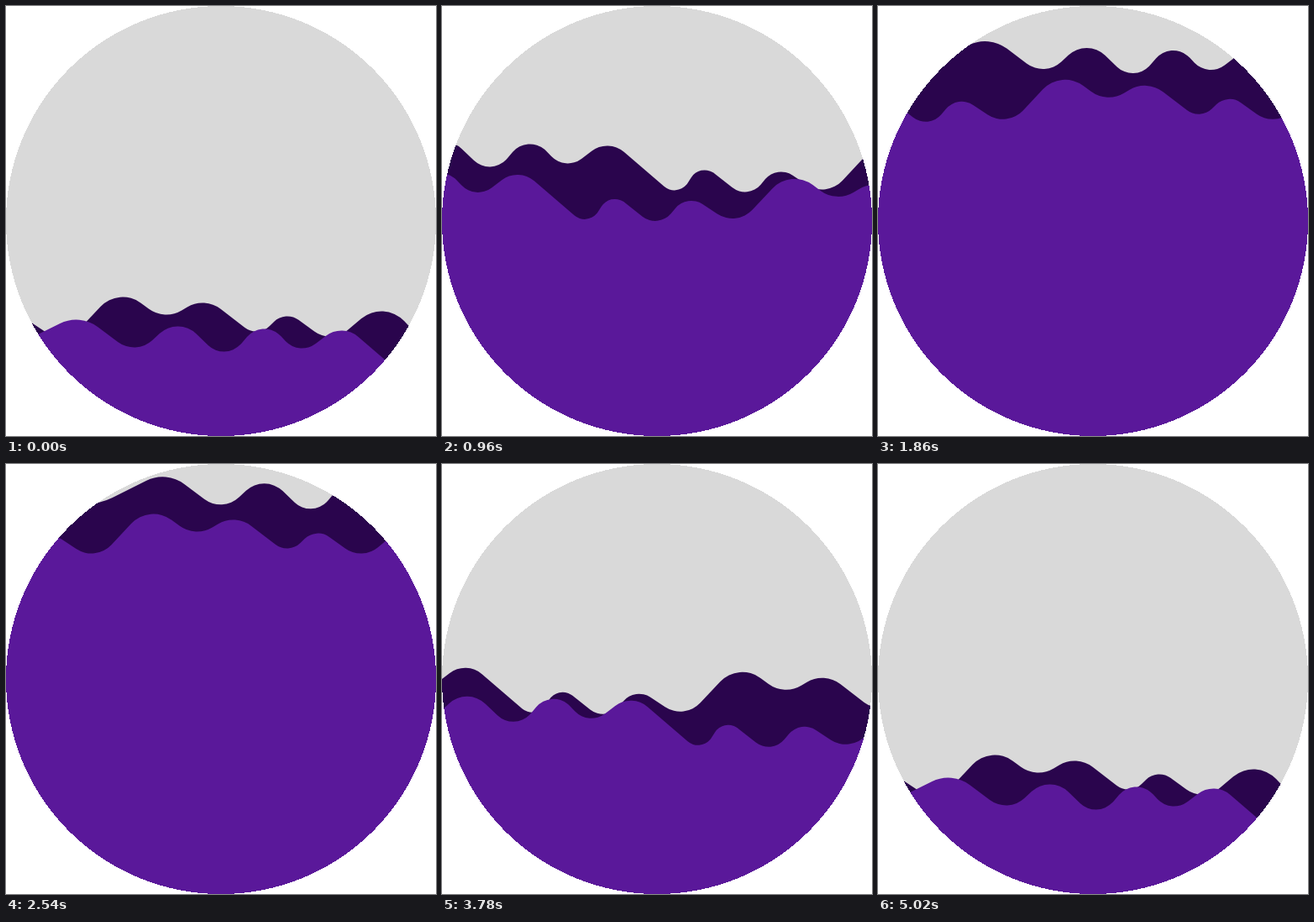
These frames come from a looping animation (512x512 px, 5.12 s). An HTML page with a canvas:

```html
<!DOCTYPE html>
<html>
<head>
<meta charset="utf-8">
<style>
  html, body { margin: 0; width: 100%; height: 100%; overflow: hidden; background: #fff; }
  canvas { display: block; }
</style>
</head>
<body>
<canvas id="stage" width="512" height="512"></canvas>
<script>
const ctx = document.getElementById('stage').getContext('2d');
const SIZE = 512, FAR = 2000;

// Key points of the wave: lowest and highest points in turn, starting low
const points = [
  [-210, 186], [-119, 154], [-50, 187], [2, 162], [57, 192], [105, 165], [150, 188],
  [197, 167], [277, 220], [313, 196], [361, 222], [404, 198], [453, 219], [527, 172],
  [579, 193], [622, 179], [686, 213], [723, 195], [774, 219], [835, 189], [910, 232]
];

// Largest sum of two radii that still fits between neighbouring points
function room(a, b) {
  if (!a || !b) return Infinity;
  const dx = b[0] - a[0], dy = b[1] - a[1];
  return (dx * dx + dy * dy) / (2 * Math.abs(dy));
}

const radii = points.map((p, i) =>
  0.485 * Math.min(room(points[i - 1], p), room(p, points[i + 1])));

// Steepness of the line touching the round bends i and i + 1
function tilt(i) {
  const a = points[i], b = points[i + 1];
  if (!a || !b) return 0;
  const sum = radii[i] + radii[i + 1];
  const dx = b[0] - a[0], dy = Math.abs(b[1] - a[1]) - sum;
  return Math.atan2(dy, dx) + Math.asin(Math.min(1, sum / Math.hypot(dx, dy)));
}

// Arcs joined by their common tangents, filled down to far below the stage
const wave = new Path2D();
wave.moveTo(-FAR, FAR);
wave.lineTo(-FAR, points[0][1]);
points.forEach(([x, y], i) => {
  const side = i % 2 ? -1 : 1, mid = side * Math.PI / 2;
  wave.arc(x, y - side * radii[i], radii[i],
    mid + side * tilt(i - 1), mid - side * tilt(i), side > 0);
});
wave.lineTo(FAR, points[points.length - 1][1]);
wave.lineTo(FAR, FAR);

// Disc with a hard pixel edge
const disc = new Path2D();
for (let y = 0; y < SIZE; y++) {
  const half = Math.round(Math.sqrt(256 ** 2 - (y - 255.5) ** 2));
  disc.rect(256 - half, y, 2 * half, 1);
}

// cubic-bezier(0, 0, .58, 1)
function easeOut(u) {
  let lo = 0, hi = 1;
  for (let i = 0; i < 30; i++) {
    const s = (lo + hi) / 2;
    if (1.74 * (1 - s) * s * s + s ** 3 < u) lo = s; else hi = s;
  }
  return lo * lo * (3 - 2 * lo);
}

function drawWave(color, x, y, dx, dy, level) {
  ctx.setTransform(1, 0, 0, 1, x + dx * level, y + dy * level);
  ctx.fillStyle = color;
  ctx.fill(wave);
}

const start = performance.now();

function draw() {
  const time = Math.max(0, performance.now() - start) % 5120;
  const step = Math.min(251, Math.floor(time / 20));
  const level = step < 126 ? easeOut(step / 125) : 1 - easeOut((step - 126) / 125);

  ctx.setTransform(1, 0, 0, 1, 0, 0);
  ctx.globalCompositeOperation = 'source-over';
  ctx.clearRect(0, 0, SIZE, SIZE);
  ctx.fillStyle = '#d9d9d9';
  ctx.fill(disc);

  // Waves show only inside the disc
  ctx.globalCompositeOperation = 'source-atop';
  drawWave('#2a054d', -388, 174.5, 703, -317.5, level);
  drawWave('#5a189a', 202.5, 219.5, -561.5, -336.5, level);
  requestAnimationFrame(draw);
}
draw();
</script>
</body>
</html>
```
